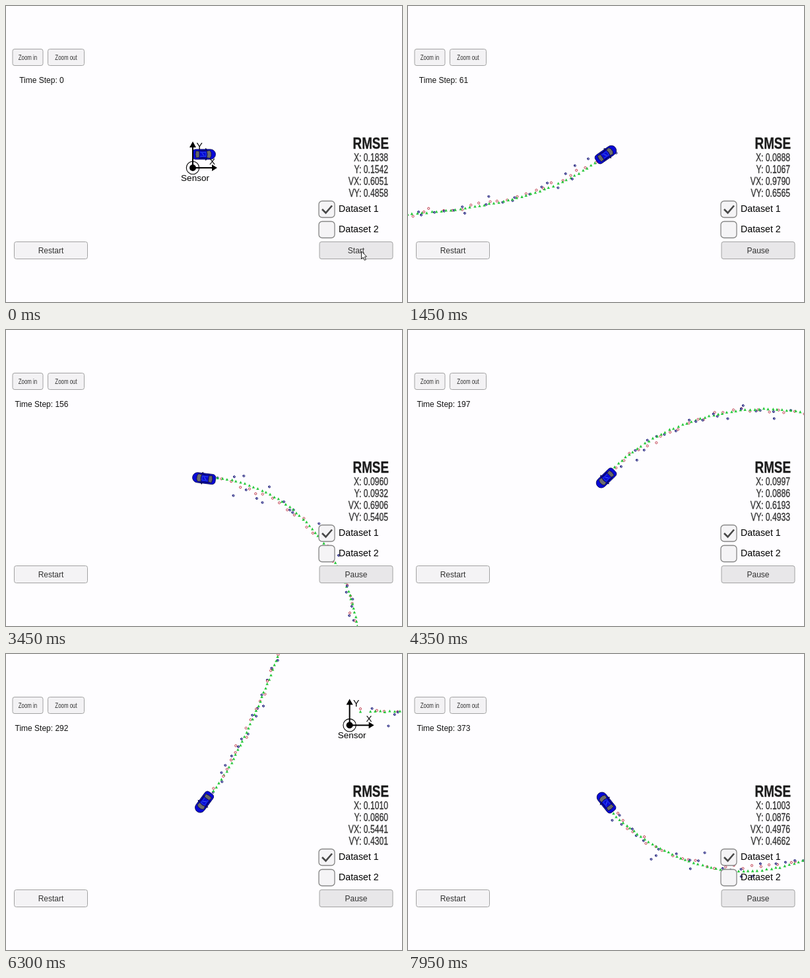
Recreate the animation shown at these times as an HTML page with a canvas. Size 600x450 px, loop 8000 ms.

```html
<!DOCTYPE html>
<html>
<head>
<meta charset="utf-8">
<style>
html, body { margin: 0; width: 100%; height: 100%; overflow: hidden; background: #fefdff; }
canvas { display: block; }
</style>
</head>
<body>
<canvas id="stage" width="600" height="450"></canvas>
<script>
const ctx = document.getElementById('stage').getContext('2d');
const LOOP = 8000, FRAME = 50, LAST_STEP = 373;
const SCALE = 28.4;            // pixels per metre
const DT = 0.05, OMEGA = 2 * Math.PI / 25;
const CENTER = { x: 300, y: 225 };
const SANS = '"Liberation Sans", Arial, sans-serif';
const NARROW = 0.76;

// time, step, then the four error readings
const keys = [
  [150, 0, 0.1838, 0.1542, 0.6051, 0.4858],
  [1450, 61, 0.0888, 0.1067, 0.9790, 0.6565],
  [2550, 114, 0.0923, 0.0979, 0.7619, 0.5878],
  [4350, 197, 0.0997, 0.0886, 0.6193, 0.4933],
  [5650, 260, 0.0992, 0.0849, 0.5618, 0.4381],
  [7000, 327, 0.1030, 0.0871, 0.5251, 0.4215],
  [7950, LAST_STEP, 0.1003, 0.0876, 0.4976, 0.4662]
];

function readingsAt(time) {
  const i = Math.max(1, keys.findIndex(k => k[0] >= time));
  const a = keys[i - 1], b = keys[i];
  const f = Math.max(0, (time - a[0]) / (b[0] - a[0]));
  const [, step, ...errors] = a.map((v, col) => v + (b[col] - v) * f);
  return { step: Math.round(step), errors };
}

function rand(n, salt) {
  const v = Math.sin(n * 12.9898 + salt * 78.233) * 43758.5453;
  return v - Math.floor(v);
}
const noise = (n, salt, size) => (rand(n, salt) + rand(n, salt + 20) - 1) * size;

// The car drives a figure of eight: turn rate and speed are plain sinusoids
const yawAt = n => 0.55 / OMEGA * (1 - Math.cos(OMEGA * DT * n));
const speedAt = n => 5 + 0.2 * Math.cos(2 * OMEGA * DT * n);

// World positions in pixels relative to the sensor
const path = buildPath();
function buildPath() {
  const points = [{ x: 17, y: -21 }];
  let { x, y } = points[0];
  for (let n = 0; n <= LAST_STEP; n++) {
    const yaw = yawAt(n + 0.5), d = speedAt(n + 0.5) * DT * SCALE;
    x += d * Math.cos(yaw);
    y -= d * Math.sin(yaw);
    if (n) points.push({ x, y });
  }
  return points;
}

function text(str, x, y, size, { align = 'left', color = '#000', weight = '', squeeze = 1, bolder = 0 } = {}) {
  ctx.save();
  ctx.translate(x, y);
  ctx.scale(squeeze, 1);
  ctx.font = `${weight} ${size}px ${SANS}`;
  ctx.textAlign = align;
  ctx.fillStyle = ctx.strokeStyle = color;
  ctx.fillText(str, 0, 0);
  if (bolder) {
    ctx.lineWidth = bolder;
    ctx.strokeText(str, 0, 0);
  }
  ctx.restore();
}

function poly(points, fill, stroke) {
  ctx.beginPath();
  points.forEach(([x, y]) => ctx.lineTo(x, y));
  ctx.closePath();
  if (fill) { ctx.fillStyle = fill; ctx.fill(); }
  if (stroke) { ctx.strokeStyle = stroke; ctx.stroke(); }
}

function line(points, color, width) {
  ctx.beginPath();
  points.forEach(([x, y]) => ctx.lineTo(x, y));
  ctx.strokeStyle = color;
  ctx.lineWidth = width;
  ctx.stroke();
}

function box(x, y, w, h, radius, fill, stroke, width = 1) {
  ctx.beginPath();
  ctx.roundRect(x + 0.5, y + 0.5, w - 1, h - 1, radius);
  ctx.fillStyle = fill;
  ctx.fill();
  ctx.lineWidth = width;
  ctx.strokeStyle = stroke;
  ctx.stroke();
}

function disc(x, y, r, fill, stroke, width = 1) {
  ctx.beginPath();
  ctx.arc(x, y, r, 0, 2 * Math.PI);
  if (fill) { ctx.fillStyle = fill; ctx.fill(); }
  if (stroke) { ctx.strokeStyle = stroke; ctx.lineWidth = width; ctx.stroke(); }
}

function drawLidar(n, x, y) {
  disc(x + noise(n, 1, 6), y + noise(n, 2, 6), 1.6, '#fff', '#b8283c', 0.9);
}

// Radar errors are mostly small with a few far strays
function drawRadar(n, x, y) {
  const reach = 3 + 26 * rand(n, 3) ** 3, angle = rand(n, 4) * 2 * Math.PI;
  const bx = x + reach * Math.cos(angle), by = y + reach * Math.sin(angle);
  disc(bx, by, 1.5, '#c8c8f0', '#10106e', 0.9);
  line([[bx, by], [bx - 1.8, by - 0.8]], '#10106e', 1);
}

// The estimate swings to the outside of the turn
function drawEstimate(n, x, y) {
  const swing = 2.5 * Math.sin(OMEGA * DT * n) * (1 + Math.cos(2 * Math.PI * (n - 47) / 48));
  const yaw = yawAt(n);
  const ex = x + swing * Math.sin(yaw) + noise(n, 5, 1);
  const ey = y + swing * Math.cos(yaw) + noise(n, 6, 1);
  poly([[ex, ey - 2.2], [ex + 2.2, ey + 1.9], [ex - 2.2, ey + 1.9]], '#28c83c');
}

function drawTrail(step, cam) {
  for (let n = 0; n < step; n++) {
    const x = path[n].x - cam.x, y = path[n].y - cam.y;
    if (x < -50 || x > 650 || y < -50 || y > 500) continue;
    (n % 2 ? drawRadar : drawLidar)(n, x, y);
    if (n < step - 1) drawEstimate(n, x, y);
  }
}

function drawCar(yaw) {
  ctx.save();
  ctx.translate(CENTER.x, CENTER.y + 0.5);
  ctx.rotate(-yaw);
  ctx.lineWidth = 0.8;
  for (const side of [-1, 1]) poly([[1.5, side * 7], [2.5, side * 9.8], [5, side * 7]], '#06063c');
  ctx.beginPath();
  ctx.roundRect(-17.5, -7.6, 35, 15.2, [5, 8, 8, 5]);
  ctx.fillStyle = '#0808d8';
  ctx.fill();
  ctx.strokeStyle = '#04044a';
  ctx.stroke();
  poly([[4, -5], [9, -6], [11, -2.5], [11, 2.5], [9, 6], [4, 5], [5, 0]], '#6c6c6c', '#101038');
  poly([[-7, -4.5], [-12, -5.5], [-13, 0], [-12, 5.5], [-7, 4.5]], '#666668', '#101038');
  for (const side of [-1, 1]) line([[-8, side * 6], [-2, side * 5.4], [5, side * 6.2]], '#080848', 1.2);
  line([[-6, -3], [3, -3], [3, 3], [-6, 3]], '#2c50e8', 0.8);
  line([[-3, -2], [0, 2]], '#5078f0', 0.8);
  ctx.restore();
}

function drawSensor(x, y) {
  if (x < -60 || x > 660 || y < -60 || y > 510) return;
  disc(x, y, 9.7, null, '#000', 1.1);
  disc(x, y, 5, '#000');
  line([[x, y], [x, y - 33]], '#000', 2);
  line([[x, y], [x + 31, y]], '#000', 2);
  poly([[x, y - 40], [x + 5, y - 31], [x - 5, y - 31]], '#000');
  poly([[x + 37, y], [x + 29, y - 5], [x + 29, y + 5]], '#000');
  text('Y', x + 5.5, y - 28, 14);
  text('X', x + 25, y - 5, 13.5);
  text('Sensor', x + 3.5, y + 20, 13.5, { align: 'center' });
}

function button(label, x, y, w, h, fill, size, squeeze = 1) {
  box(x, y, w, h, 3, fill, '#a2a2a2');
  text(label, x + w / 2, y + h / 2 + size * 0.37, size, { align: 'center', color: '#323232', squeeze });
}

function checkbox(label, y, checked) {
  box(473.5, y, 25, 26, 5, '#f5f4f6', '#868686', 1.3);
  if (checked) line([[479, y + 13], [484.5, y + 18.5], [494, y + 7.5]], '#484848', 2.6);
  text(label, 504, y + 17.3, 14.2);
}

function drawCursor(x, y) {
  ctx.lineWidth = 1;
  poly([[x, y], [x, y + 11.5], [x + 2.6, y + 9], [x + 4.8, y + 13.5], [x + 6.8, y + 12.5],
    [x + 4.8, y + 8.3], [x + 8, y + 8]], '#fff', '#222');
}

function drawPanel(step, errors, time) {
  button('Zoom in', 9.5, 65, 47, 26, '#f3f2f4', 10.4, NARROW);
  button('Zoom out', 63, 65, 56, 26, '#f3f2f4', 10.4, NARROW);
  text('Time Step: ' + step, 54, 117, 12, { align: 'center', color: '#111' });

  text('RMSE', 580, 216.5, 24.8, { align: 'right', weight: 'bold', color: '#1c1c1c', squeeze: NARROW, bolder: 0.4 });
  ['X', 'Y', 'VX', 'VY'].forEach((name, i) => {
    text(`${name}: ${errors[i].toFixed(4)}`, 579, 236 + i * 18, 16,
      { align: 'right', color: '#333', squeeze: NARROW, bolder: 0.35 });
  });

  checkbox('Dataset 1', 296, true);
  checkbox('Dataset 2', 327, false);
  button('Restart', 12, 358, 112, 27, '#f4f3f5', 12);
  button(time < 100 ? 'Start' : 'Pause', 474.5, 358, 112, 27, '#e8e7e9', 12);
  if (time < 400) drawCursor(538.5, 373);
}

function draw(now) {
  const time = Math.floor((now % LOOP) / FRAME) * FRAME;
  const { step, errors } = readingsAt(time);
  const cam = { x: path[step].x - CENTER.x, y: path[step].y - CENTER.y };
  ctx.fillStyle = '#fefdff';
  ctx.fillRect(0, 0, 600, 450);
  drawTrail(step, cam);
  drawCar(yawAt(step));
  drawSensor(-cam.x, -cam.y);
  drawPanel(step, errors, time);
}

const start = performance.now();
function tick() {
  draw(performance.now() - start);
  requestAnimationFrame(tick);
}
tick();
</script>
</body>
</html>
```
